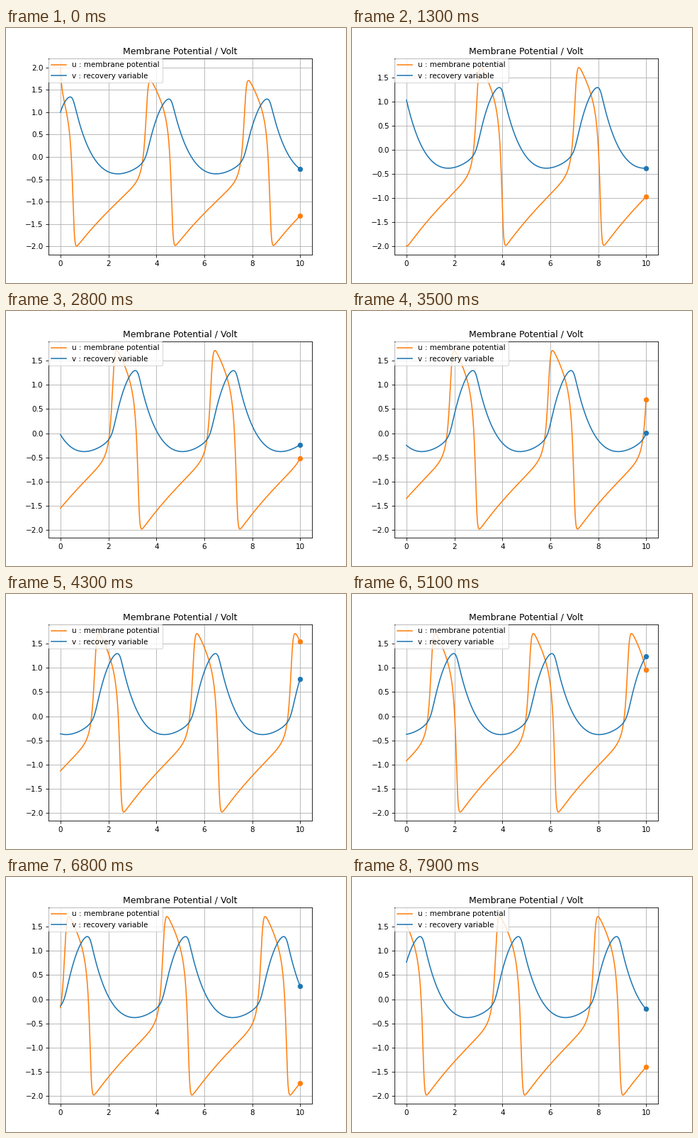
A matplotlib script that plays this animation: 480x360 px, repeating every 8000 ms.

```python
import numpy as np
import matplotlib.pyplot as plt
from matplotlib.animation import FuncAnimation

# FitzHugh-Nagumo neuron model
A, B, C, I_EXT = 0.7, 0.8, 10.0, 0.34
DT, WINDOW, STEP = 0.01, 1000, 5
FRAMES, INTERVAL = 80, 100


def fhn(s):
    u, v = s
    return np.array([C * (u - u**3 / 3 - v + I_EXT), u + A - B * v])


def solve(s, count, substeps=4):
    """Integrate with classic Runge-Kutta, sampling every DT."""
    h = DT / substeps
    out = [s]
    for _ in range(count - 1):
        for _ in range(substeps):
            k1 = fhn(s)
            k2 = fhn(s + h / 2 * k1)
            k3 = fhn(s + h / 2 * k2)
            k4 = fhn(s + h * k3)
            s = s + h / 6 * (k1 + 2 * k2 + 2 * k3 + k4)
        out.append(s)
    return np.array(out)


path = solve(np.array([2.0, 1.0]), WINDOW + FRAMES * STEP)
t = np.arange(WINDOW) * DT

fig, ax = plt.subplots(figsize=(6.4, 4.8), dpi=75)
ax.set_title("Membrane Potential / Volt")
ax.grid(True)

labels = ("u : membrane potential", "v : recovery variable")
colors = ("#ff7f0e", "#1f77b4")
lines = [ax.plot(t, path[:WINDOW, k], color=colors[k], label=labels[k])[0]
         for k in range(2)]
dots = [ax.plot(t[-1:], path[WINDOW - 1:WINDOW, k], "o", color=colors[k])[0]
        for k in range(2)]
ax.legend(loc="upper left", borderaxespad=0)


def update(i):
    view = path[i * STEP:i * STEP + WINDOW]
    for k in range(2):
        lines[k].set_ydata(view[:, k])
        dots[k].set_ydata(view[-1:, k])
    ax.relim()
    ax.autoscale_view()
    return lines + dots


anim = FuncAnimation(fig, update, frames=FRAMES, interval=INTERVAL, repeat=True)
plt.show()
```
